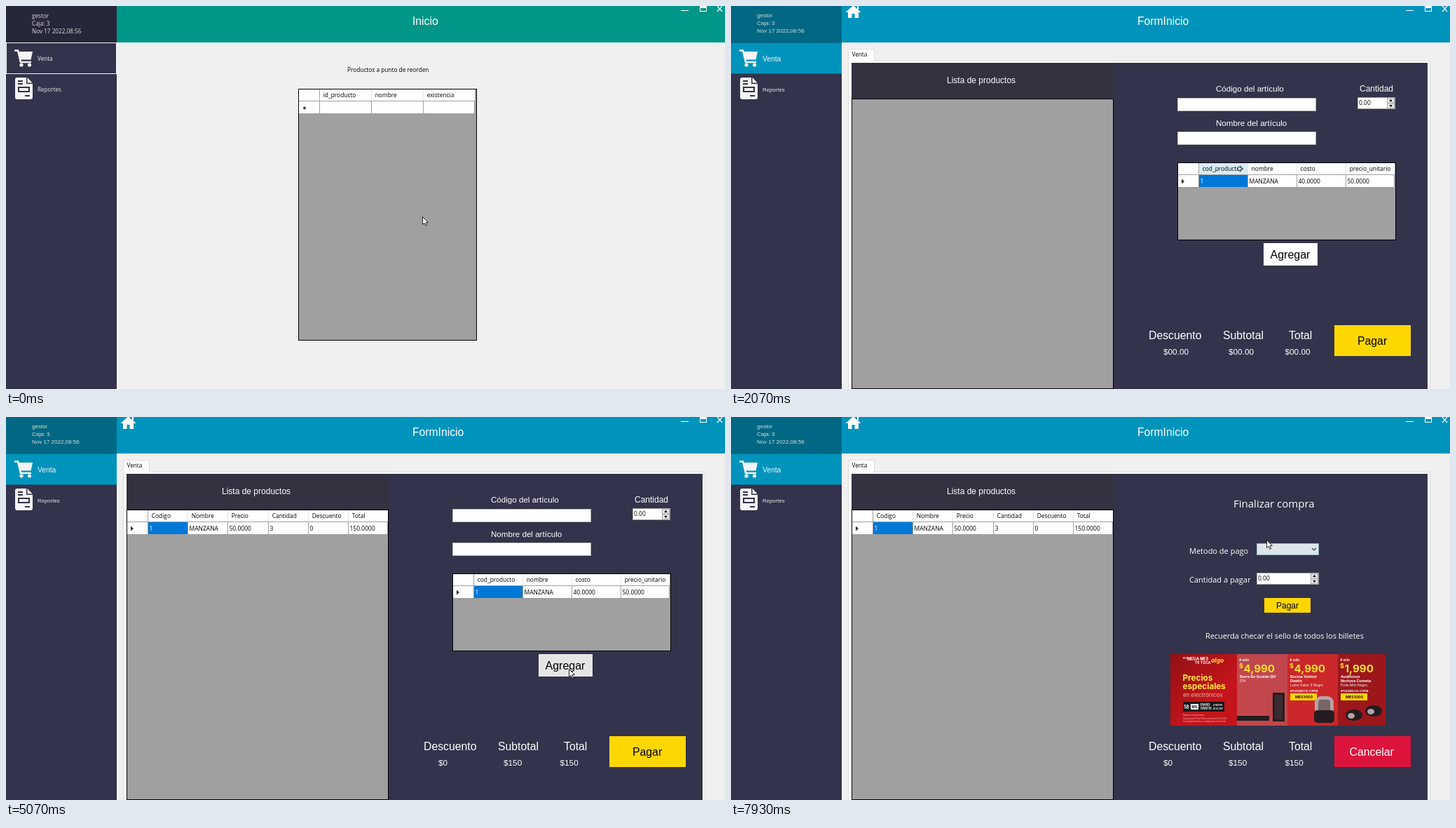
An HTML page with a canvas for the animation above (8000 ms loop, 1026 by 546 pixels).

```html
<!DOCTYPE html>
<html lang="es">
<head>
<meta charset="utf-8">
<title>Punto de venta</title>
<style>
html, body { margin: 0; width: 100%; height: 100%; overflow: hidden; background: #f0f0f0; }
canvas { display: block; }
</style>
</head>
<body>
<canvas id="stage" width="1026" height="546"></canvas>
<script>
const ctx = document.getElementById('stage').getContext('2d');
const STEPS = 120, LOOP = 8000;
const UI = '"Open Sans", "Noto Sans", sans-serif';
const ARIAL = '"Liberation Sans", Arial, sans-serif';
const AD = 'Inter, sans-serif';
const NAVY = '#33334c', TEAL = '#009688', BLUE = '#0094bc', GRAY = '#a0a0a0', GOLD = '#ffd700', PALE = '#f4f4f4';

// Steps at which the application reacts
const OPEN = 20, SELECT_ROW = 39, FILL = 42, DRAG = 52, TYPE = 64, ADD = 75, PAY = 114;

// Pointer moves: first step, last step, destination
const MOVES = [
  [0, 4, 4, 60], [4, 6, 58, 81], [10, 14, 41, 81], [17, 20, 41, 114], [20, 31, 730, 232],
  [31, 35, 648, 248], [38, 47, 928, 168], [48, 57, 833, 138], [57, 60, 860, 140], [61, 73, 802, 357],
  [75, 83, 815, 406], [84, 91, 215, 140], [91, 97, 190, 158], [97, 110, 914, 478], [PAY, 119, 764, 175]
];
let mouse = [0, 0];

function pointerAt(k) {
  let x = 594, y = 300;
  for (const [from, to, u, v] of MOVES) {
    const f = Math.min(1, Math.max(0, (k - from) / (to - from)));
    const ease = f * f * (3 - 2 * f);
    x += (u - x) * ease;
    y += (v - y) * ease;
  }
  return [Math.round(x), Math.round(y)];
}

const over = (x, y, w, h) => mouse[0] >= x && mouse[0] < x + w && mouse[1] >= y && mouse[1] < y + h;

function box(x, y, w, h, fill, line) {
  if (fill) { ctx.fillStyle = fill; ctx.fillRect(x, y, w, h); }
  if (line) { ctx.strokeStyle = line; ctx.lineWidth = 1; ctx.strokeRect(x + .5, y + .5, w - 1, h - 1); }
}

function roundBox(x, y, w, h, r, fill) {
  ctx.beginPath();
  ctx.roundRect(x, y, w, h, r);
  ctx.fillStyle = fill;
  ctx.fill();
}

// y is the middle of the capitals
function text(s, x, y, size, color = '#000', font = UI, weight = '') {
  ctx.font = `${weight} ${size}px ${font}`;
  ctx.fillStyle = color;
  ctx.fillText(s, x, y + size * .36);
}
const label = (s, x, y, size, color = '#fff') => text(s, x, y, size, color, ARIAL);
const ad = (s, x, y, size, color = '#fff', weight = 'bold') => text(s, x, y, size, color, AD, weight);

function button(s, x, y, w, h, pad, size, fill, color = '#000') {
  box(x, y, w, h, fill);
  label(s, x + pad, y + h / 2 + .5, size, color);
}

function shape(points, fill, line, width = 1) {
  ctx.beginPath();
  points.forEach(([x, y]) => ctx.lineTo(x, y));
  if (fill) { ctx.closePath(); ctx.fillStyle = fill; ctx.fill(); }
  if (line) { ctx.strokeStyle = line; ctx.lineWidth = width; ctx.stroke(); }
}

function disc(x, y, rx, fill, ry = rx) {
  ctx.beginPath();
  ctx.ellipse(x, y, rx, ry, 0, 0, 7);
  ctx.fillStyle = fill;
  ctx.fill();
}

function cart() {
  shape([[12, 63.5], [17, 63.5], [21, 80], [36, 80]], null, PALE, 2.6);
  shape([[17.5, 65], [38, 65], [35.5, 76.5], [20, 76.5]], PALE);
  for (const x of [22, 33.5]) disc(x, 84, 2.6, PALE);
}

function report() {
  roundBox(13, 102, 25, 31, 3, PALE);
  box(29, 101, 10, 10, NAVY);
  shape([[30.5, 102], [37.5, 109.5], [30.5, 109.5]], PALE);
  for (const y of [106, 110]) box(17, y, 7, 2, NAVY);
  box(17, 115, 17, 8, NAVY);
  box(19, 117, 13, 4, PALE);
  box(27, 127, 7, 2, NAVY);
}

function home() {
  shape([[163.5, 9], [174.5, -1], [185.5, 9]], '#fff');
  box(167, 8, 15, 9, '#fff');
  box(180, 0, 2, 5, '#fff');
  box(172.5, 11, 4, 6, BLUE);
}

function windowButtons() {
  box(963, 6, 11, 1, '#fff');
  box(990, 0, 10, 8, null, '#fff');
  box(990, 0, 10, 3, '#fff');
  shape([[1015, 0], [1022, 8]], null, '#fff', 1.2);
  shape([[1022, 0], [1015, 8]], null, '#fff', 1.2);
}

// Columns begin at first and share one width
function grid(x, y, w, h, first, colWidth, heads = [], cells, wholeRow) {
  box(x, y, w, h, GRAY, '#000');
  if (!heads.length) return;
  const edge = i => Math.round(first + i * colWidth);
  const end = edge(heads.length);
  box(x + 1, y + 1, end - x - 1, 34, '#fff');
  heads.forEach((head, i) => {
    const left = edge(i), width = edge(i + 1) - left;
    const chosen = cells && (wholeRow || i === 0);
    if (over(left, y, width, 17)) box(left, y + 1, width, 16, '#d9ecf5');
    if (chosen) box(left, y + 18, width, 17, '#0078d7');
    box(left, y + 1, 1, 16, i ? '#e5e5e5' : GRAY);
    box(left, y + 17, 1, 18, GRAY);
    text(head, left + 5.7, y + 9, 8.4);
    if (cells) text(cells[i], left + 2.5, y + 26.5, 8.5, chosen ? '#fff' : '#000');
  });
  box(x + 1, y + 17, end - x - 1, 1, GRAY);
  box(end - 1, y + 18, 1, 17, GRAY);
  if (cells) shape([[x + 6, y + 23.5], [x + 10, y + 27], [x + 6, y + 30.5]], '#333');
  else disc(x + 9, y + 27.5, 2, '#444');
}

function spinner(x, y, w, value, picked = 0) {
  box(x, y, w, 17, '#fff', GRAY);
  box(x + 2, y + 2, 17 * picked, 12, '#0078d7');
  text(value, x + 2, y + 8, 8.5, picked === 1 ? '#fff' : '#000');
  const mid = x + w - 6.5;
  for (const side of [-1, 1]) {
    const cy = y + 8.5 + side * 3.5;
    box(mid - 5.5, cy - 3.5, 11, 7, '#f0f0f0', GRAY);
    shape([[mid - 2.5, cy - side], [mid, cy + side * 2], [mid + 2.5, cy - side]], '#000');
  }
}

function sidebar(k) {
  const active = k > OPEN, font = active ? ARIAL : UI;
  box(0, 0, 158, 546, NAVY);
  box(0, 0, 158, 52.5, active ? '#006884' : k === OPEN ? NAVY : '#27273a');
  if (k < OPEN - 2) box(0, 52, 158, 45, null, PALE);
  else box(0, 52.5, 158, 44, active ? BLUE : '#3f3d5a');
  ['gestor', 'Caja: 3', 'Nov 17 2022,08:56'].forEach((s, i) => {
    const y = 14 + i * 11 - (active ? .5 : 0);
    if (k === OPEN) box(36, y - 6, s.length * 4 + 2, 12, '#27273a');
    text(s, 37, y, active ? 8 : 8.2, '#dcdcdc', font);
  });
  cart();
  report();
  text('Venta', 45, 75, active ? 10.3 : 8.1, PALE, font);
  text('Reportes', 45, 119, active ? 7.8 : 8.1, '#e6e6e6', font);
}

function header(k) {
  box(158, 0, 868, 52, k < OPEN ? TEAL : BLUE);
  if (k === OPEN) {
    box(162, 0, 25, 19, TEAL);
    box(576, 12, 46, 17, TEAL);
    box(954, 0, 72, 9, TEAL);
  }
  if (k > OPEN) home();
  label(k > OPEN ? 'FormInicio' : 'Inicio', 580, 21, 15.7);
  windowButtons();
}

function startPage() {
  text('Productos a punto de reorden', 487, 91.5, 8.3);
  grid(417, 118, 255, 359, 447, 74, ['id_producto', 'nombre', 'existencia']);
}

function tabs() {
  box(167, 78, 831, 480, '#fff', '#dcdcdc');
  box(167, 61, 38, 18, '#fff', '#dcdcdc');
  box(168, 78, 36, 2, '#fff');
  text('Venta', 172.5, 69.5, 8.2);
  box(172, 81, 374, 51, '#343241');
  box(546, 81, 448, 465, NAVY);
}

function halfPainted() {
  box(172, 131, 374, 415, '#fff');
  for (const y of [131, 180]) box(637, y, 197, 18, null, '#fff');
  box(638, 224, 100, 17, '#fff', GRAY);
  box(667, 224, 1, 17, GRAY);
  box(738, 224, 70, 1, '#fff');
  text('cod_producto', 673, 232.5, 8.4);
  box(638, 259, 310, 74, GRAY);
}

function entryForm(k) {
  const filled = k >= FILL && k < ADD - 1;
  const typed = k >= TYPE && k <= ADD;
  const picked = k < TYPE ? Math.min(1, Math.max(0, (k - DRAG) / 2)) : 0;
  [['Código del artículo', '1'], ['Nombre del artículo', 'MANZANA']].forEach(([name, value], i) => {
    const y = 118 + i * 48.5;
    label(name, 692, y, 11.6);
    box(637, Math.round(y + 12.6), 198, 19, '#fff', '#b8b8b8');
    if (filled) label(value, 639, y + 22.5, 12, '#000');
  });
  label('Cantidad', 897, 118, 12);
  spinner(894, 130, 54, typed ? '3' : '0.00', picked);
  grid(637, 223, 312, 111, 667, 70, ['cod_producto', 'nombre', 'costo', 'precio_unitario'],
    ['1', 'MANZANA', '40.0000', '50.0000'], k >= SELECT_ROW && k < FILL);
  button('Agregar', 760, 338, 77, 32, 9.5, 16, over(760, 338, 77, 32) ? '#e5e5e5' : '#fff');
  button('Pagar', 861, 455, 109, 44, 33, 15.8, over(861, 455, 109, 44) ? '#e6d06c' : GOLD);
}

const OFFERS = [
  { color: '#c1474d', price: '4,990', name: ['Barra De Sonido QV'], detail: 'D14' },
  { color: '#cb272b', price: '4,990', name: ['Bocina Velmor', 'Dastin'], detail: 'Lumo Salon 3 Negro', coupon: true },
  { color: '#9c171c', price: '1,990', name: ['Audífonos', 'Nortuva Cometa'], detail: 'Pods Mini Negro', coupon: true }
];

function offer({ color, price, name, detail, coupon }, i) {
  const x = 722 + i * 72;
  box(x, 338, Math.min(72, 934 - x), 102, color);
  ad('A solo', x + 3, 346.5, 4.6);
  ad('$', x + 3, 355, 9, '#ffe02e');
  ad(price, x + 9.5, 358.5, 15.2, '#ffe02e');
  name.forEach((s, n) => ad(s, x + 4, 370 + n * 6.2, 5.4));
  ad(detail, x + 4, 370 + name.length * 6.2, 4.9, '#fff', '');
  if (!coupon) return;
  ad('APLICANDO EL CUPÓN', x + 4, 391, 3.5);
  box(x + 4, 394, 38, 10, GOLD);
  ad('MES1000', x + 11, 399, 5.4, '#300');
}

function gadgets() {
  const dark = '#241c20';
  box(722, 426, 46, 7, dark);
  box(773, 393, 17, 41, dark);
  box(776, 396, 11, 35, '#3a2b30');
  roundBox(833, 398, 27, 27, 9, '#b9a3a2');
  roundBox(838, 403, 17, 18, 4, '#776466');
  roundBox(832, 418, 29, 18, 5, dark);
  for (const [x, y] of [[889, 425], [917, 419]]) {
    disc(x, y, 12, dark, 8);
    disc(x - 4, y + 1, 5, '#b0a4a4', 4);
  }
}

function banner() {
  const red = ctx.createLinearGradient(627, 338, 690, 400);
  red.addColorStop(0, '#930f14');
  red.addColorStop(1, '#c3151b');
  box(627, 338, 95, 102, red);
  ad('HOY', 645, 343.5, 3);
  ad('MEGA MES', 651, 345, 5.6);
  ad('TE TOCA', 662, 350, 5.2);
  ad('algo', 685, 347, 8.5, '#ffe02e', 'italic bold');
  ['Precios', 'especiales'].forEach((s, i) => ad(s, 644.5, 371.5 + i * 12.5, 11.7, '#ffec3d'));
  ad('en electrónicos', 645, 396, 7.8, '#f0b8a8', '');
  box(645, 406, 59, 14, '#161616');
  ad('18', 646, 413.5, 7);
  box(656, 409, 11, 8, '#fff');
  ad('MSI', 657.5, 413, 4.3, '#111');
  ['ENVÍO', 'GRATIS'].forEach((s, i) => ad(s, 670, 410.5 + i * 5, 4.3));
  ['A PARTIR', 'DE $1,499'].forEach((s, i) => ad(s, 688, 410.5 + i * 5, 2.8));
  ['Aplican restricciones.', 'Vigencia del 13 al 19 de noviembre del 2022', 'Consulta términos y condiciones en tienda']
    .forEach((s, i) => ad(s, 645, 425 + i * 4.5, 3, '#f3c6c0', ''));
  OFFERS.forEach(offer);
  gadgets();
}

function payForm() {
  text('Finalizar compra', 717, 124, 15, '#fff');
  text('Metodo de pago', 654, 191, 11, '#fff');
  box(750, 180, 89, 17, '#dfe6e9', '#8fb5cb');
  shape([[829, 187], [832, 190], [835, 187]], null, '#333', 1.2);
  text('Cantidad a pagar', 654, 232, 11, '#fff');
  spinner(750, 222, 89, '0.00');
  button('Pagar', 761, 258, 66, 21, 17, 12, GOLD);
  text('Recuerda checar el sello de todos los billetes', 677, 312.5, 10.9, '#fff');
  banner();
  button('Cancelar', 861, 455, 109, 44, 21.5, 15.8, '#dc143c', '#fff');
}

function salePage(k) {
  tabs();
  if (k === OPEN) return halfPainted();
  label('Lista de productos', 308, 106, 12);
  const listed = k >= ADD;
  grid(172, 132, 374, 414, 202, 57.2,
    listed ? ['Codigo', 'Nombre', 'Precio', 'Cantidad', 'Descuento', 'Total'] : [],
    ['1', 'MANZANA', '50.0000', '3', '0', '150.0000']);
  if (k < PAY) entryForm(k); else payForm();
  [['Descuento', 596, 617, '$0'], ['Subtotal', 702, 710, '$150'], ['Total', 796, 790.5, '$150']]
    .forEach(([name, x, sumX, sum]) => {
      label(name, x, 469, 15.8);
      label(k > ADD ? sum : '$00.00', sumX, 492.5, 11.8);
    });
}

function pointer(k) {
  const [x, y] = mouse;
  ctx.save();
  ctx.translate(x, y);
  if (k === 31) {
    for (const side of [-1, 1]) {
      ctx.scale(side, 1);
      shape([[0, -1], [3, -1], [3, -4], [7.5, 0], [3, 4], [3, 1], [0, 1]], '#fff', '#222', .9);
    }
  } else if (k >= 34 && k <= 40) {
    shape([[-6, -1], [1, -1], [1, -4], [6, 0], [1, 4], [1, 1], [-6, 1]], '#000');
  } else if (k >= DRAG && k < TYPE) {
    const color = over(637, 130, 198, 20) || over(894, 130, 42, 18) ? '#000' : '#ccc';
    box(0, -5, 1, 11, color);
    for (const end of [-6, 6]) box(-2, end, 5, 1, color);
  } else {
    shape([[.5, .5], [.5, 11.5], [3, 9.3], [4.9, 13.4], [6.7, 12.6], [4.9, 8.7], [8.4, 8.4], [.5, .5]], '#fff', '#111', .9);
  }
  ctx.restore();
}

function draw(now) {
  const k = Math.floor((now % LOOP + 5) * STEPS / LOOP) % STEPS;
  mouse = pointerAt(k);
  box(0, 0, 1026, 546, '#f0f0f0');
  header(k);
  sidebar(k);
  if (k < OPEN) startPage(); else salePage(k);
  pointer(k);
}

let start;
function tick(now) {
  start ??= now;
  draw(now - start);
  requestAnimationFrame(tick);
}
requestAnimationFrame(tick);
</script>
</body>
</html>
```
